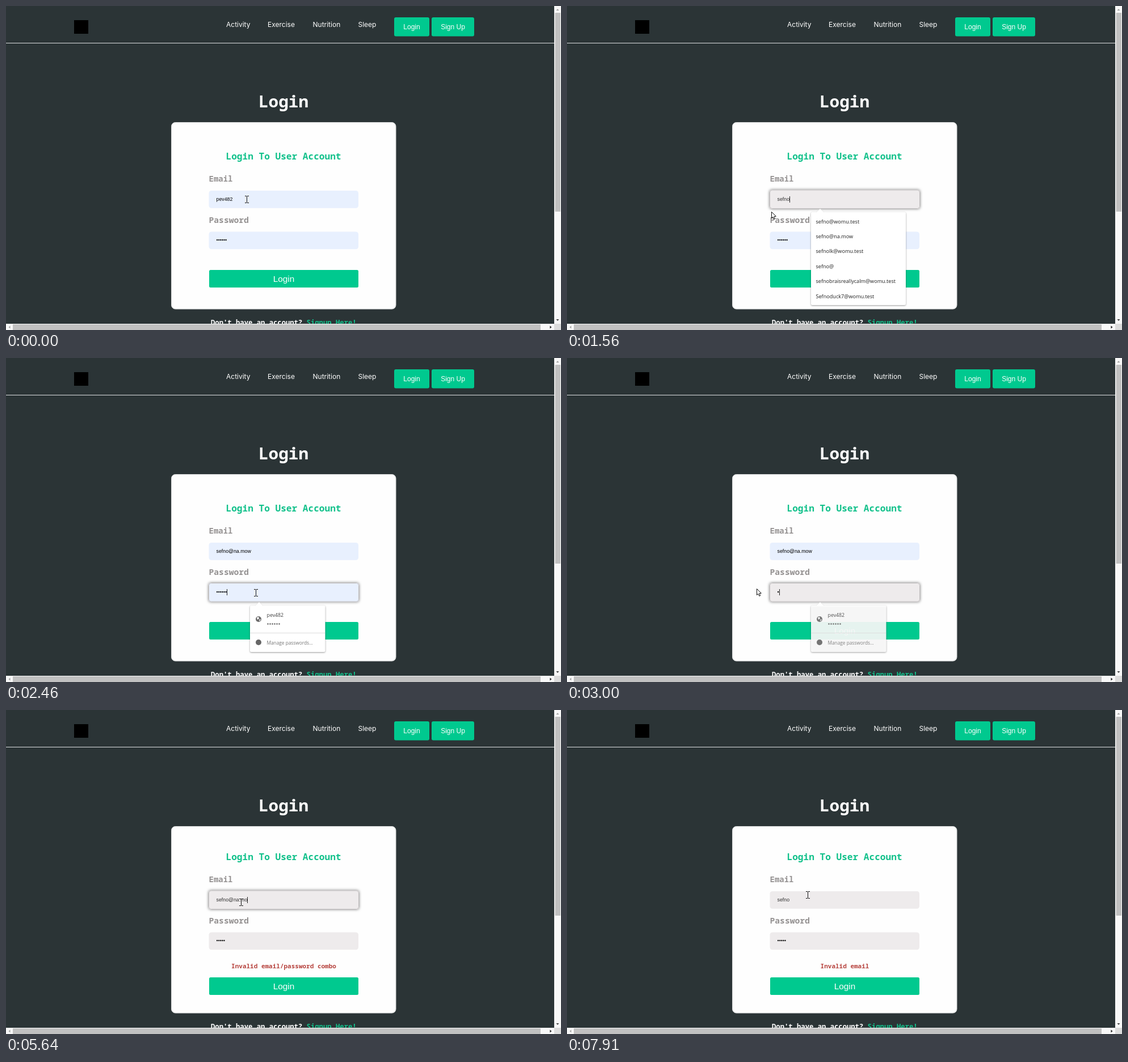
Animation, 978 px wide and 572 px high, one loop 8000 ms. Source, as an HTML page with a canvas:

```html
<!DOCTYPE html>
<html lang="en">
<head>
<meta charset="utf-8">
<title>Login form</title>
<style>
html, body { margin: 0; width: 100%; height: 100%; overflow: hidden; background: #2b3436; }
canvas { display: block; }
</style>
</head>
<body>
<canvas id="stage" width="978" height="572"></canvas>
<script>
const ctx = document.getElementById('stage').getContext('2d');
const LOOP = 8000, STEP = 90;
const GREEN = '#00c98f', FILLED = '#e8f0fe', TYPED = '#eeebec';
const MONO = '"Noto Sans Mono", "DejaVu Sans Mono", monospace';
const ARIAL = '"Liberation Sans", Arial, sans-serif';
const UI = '"Open Sans", "Noto Sans", sans-serif';
const NAV = 'Inter, sans-serif';

const OLD_USER = 'pev482', NAME = 'sefno', PICKED = 'sefno@na.mow';
const SHORT_LIST = ['sefno@womu.test', PICKED, 'sefnolk@womu.test', 'srulo@womu.test', 'sopune@sn', 'sn'];
const LONG_LIST = ['sefno@womu.test', PICKED, 'sefnolk@womu.test', 'sefno@',
  'sefnobraisreallycalm@womu.test', 'Sefnoduck7@womu.test'];

// Pointer moves: first step, last step, x, y
const MOVES = [
  [90, 180, 304, 343],
  [1560, 1920, 459, 399],
  [2010, 2010, 462, 403],
  [2280, 2280, 440, 414],
  [2550, 2820, 334, 407],
  [4290, 4560, 423, 476],
  [4740, 5010, 420, 447],
  [5100, 5280, 414, 339],
  [7100, 7280, 400, 482],
  [7550, 7820, 431, 384],
  [7910, 7910, 424, 326]
];

const during = (t, a, b) => t >= a && t < b;
const stepsSince = (t, start) => Math.floor((t - start) / STEP) + 1;

function pointerAt(t) {
  let x = 424, y = 341;
  for (const [from, to, tx, ty] of MOVES) {
    if (t < from) break;
    const p = Math.min(1, stepsSince(t, from) / ((to - from) / STEP + 1));
    const k = p * (2 - p);
    x += (tx - x) * k;
    y += (ty - y) * k;
  }
  return { x: Math.round(x), y: Math.round(y) };
}

function emailAt(t) {
  if (t < 640) return OLD_USER;
  if (t < 2190) return NAME.slice(0, stepsSince(t, 640));
  if (t < 5640) return PICKED;
  if (t < 6740) return PICKED.slice(0, Math.max(4, PICKED.length - stepsSince(t, 5640)));
  return NAME;
}

function dotsAt(t) {
  if (t < 3000) return 6;
  return 1 + [3180, 3360, 3540, 3820].filter(at => t >= at).length;
}

function sceneAt(t) {
  const s = { t, pointer: pointerAt(t), email: emailAt(t), dots: dotsAt(t), row: -1 };
  s.shift = t >= 4650 ? 6 : 0;
  s.emailY = 326 - s.shift;
  s.passY = 398.5 - s.shift;
  s.buttonY = 466 + s.shift;
  s.error = !s.shift ? '' : t < 7370 ? 'Invalid email/password combo' : 'Invalid email';
  s.focus = during(t, 90, 2370) || during(t, 5370, 7370) ? 'email' : during(t, 2370, 4560) ? 'pass' : '';
  s.emailFill = during(t, 640, 2190) || t >= 5640 ? TYPED : FILLED;
  s.passFill = t >= 3000 ? TYPED : FILLED;
  if (during(t, 640, 2190) || during(t, 6740, 7370)) {
    s.list = during(t, 640, 730) ? SHORT_LIST : LONG_LIST;
    s.listW = s.list === SHORT_LIST ? 114 : 167;
    const { x, y } = s.pointer, top = s.emailY + 41;
    if (x > 430 && x < 430 + s.listW && y > top) s.row = Math.floor((y - top) / 26.4);
  }
  if (s.row >= 0) {
    s.email = s.list[s.row];
    s.emailFill = FILLED;
  }
  s.saved = during(t, 90, 730) || during(t, 2370, 3090) || during(t, 5370, 5640);
  s.savedAlpha = during(t, 640, 730) || during(t, 3000, 3090) ? 0.9 : 1;
  return s;
}

function text(str, x, y, font, color, align = 'left') {
  ctx.font = font;
  ctx.fillStyle = color;
  ctx.textAlign = align;
  ctx.fillText(str, x, y);
}

function rect(x, y, w, h, color) {
  ctx.fillStyle = color;
  ctx.fillRect(x, y, w, h);
}

function box(x, y, w, h, r, color, stroke) {
  ctx.beginPath();
  ctx.roundRect(x, y, w, h, r);
  ctx.fillStyle = color;
  ctx.fill();
  if (stroke) {
    ctx.strokeStyle = stroke;
    ctx.lineWidth = 1;
    ctx.stroke();
  }
}

function circle(x, y, r, color) {
  ctx.beginPath();
  ctx.arc(x, y, r, 0, Math.PI * 2);
  ctx.fillStyle = color;
  ctx.fill();
}

function poly(points, fill, stroke) {
  ctx.beginPath();
  points.forEach(([x, y]) => ctx.lineTo(x, y));
  ctx.closePath();
  ctx.fillStyle = fill;
  ctx.fill();
  if (stroke) {
    ctx.strokeStyle = stroke;
    ctx.lineWidth = 1;
    ctx.stroke();
  }
}

function withShadow(color, blur, dy, draw) {
  ctx.save();
  ctx.shadowColor = color;
  ctx.shadowBlur = blur;
  ctx.shadowOffsetY = dy;
  draw();
  ctx.restore();
}

function drawHeader() {
  rect(0, 0, 978, 572, '#2b3436');
  rect(0, 65, 966, 1, '#dfe1e1');
  rect(120, 25, 25, 24, '#000');
  [['Activity', 388], ['Exercise', 461], ['Nutrition', 540.5], ['Sleep', 620.5]]
    .forEach(([label, x]) => text(label, x, 37, `12px ${NAV}`, '#fff'));
  [['Login', 684, 62], ['Sign Up', 750, 75]].forEach(([label, x, w]) => {
    box(x, 20, w, 33.5, 3, GREEN);
    text(label, x + w / 2, 40.5, `12px ${ARIAL}`, '#fff', 'center');
  });
  text('Login', 489, 179, `bold 29.33px ${MONO}`, '#fff', 'center');
}

function drawField(y, fill, focused) {
  if (focused) {
    withShadow('rgba(0,0,0,.55)', 5, 0, () => box(357, y - 1.5, 265, 33.5, 4, fill));
    box(357.5, y - 1, 264, 32.5, 4, fill, '#c3c0c1');
  } else {
    box(357.5, y, 263.5, 30.8, 4.5, fill);
  }
}

function drawCaret(x, y) {
  rect(Math.round(x), y - 5, 1, 11, '#222');
}

function drawEmail(s) {
  const mid = s.emailY + 15, focused = s.focus === 'email';
  const selected = during(s.t, 90, 640);
  const font = `8.8px ${ARIAL}`;
  drawField(s.emailY, s.emailFill, focused);
  ctx.font = font;
  const w = ctx.measureText(s.email).width;
  if (selected) rect(370.5, mid - 5, w, 11, '#3390ff');
  text(s.email, 370.5, mid + 3, font, selected ? '#fff' : s.emailFill === TYPED ? '#333' : '#000');
  if (focused && !selected && s.row < 0) drawCaret(370.5 + w, mid);
}

function drawPassword(s) {
  const mid = Math.round(s.passY + 14.5), focused = s.focus === 'pass';
  const selected = during(s.t, 2550, 3000);
  drawField(s.passY, s.passFill, focused);
  if (selected) rect(370.5, mid - 5, s.dots * 3.1, 11, '#3390ff');
  for (let i = 0; i < s.dots; i++) circle(372.1 + i * 3.1, mid, 1.2, selected ? '#fff' : '#111');
  if (focused && !selected) drawCaret(370.5 + s.dots * 3.1, mid);
}

function drawForm(s) {
  const up = s.shift;
  box(291.5, 205.5, 395.5, 329.5, 7, '#fefefe', '#d5d7d7');
  text('Login To User Account', 489, 271 - up, `bold 16.13px ${MONO}`, '#12c18b', 'center');
  text('Email', 357.5, 310 - up, `bold 14px ${MONO}`, '#959292');
  text('Password', 357.5, 382.5 - up, `bold 14.67px ${MONO}`, '#959292');
  drawEmail(s);
  drawPassword(s);
  text(s.error, 489.5, 456, `bold 11px ${MONO}`, '#b7443f', 'center');
  box(358, s.buttonY, 263, 31, 2.5, GREEN);
  text('Login', 489.5, s.buttonY + 21, `15.3px ${ARIAL}`, '#fff', 'center');
  text("Don't have an account?", 361, 563, `bold 12.22px ${MONO}`, '#fff');
  text('Signup Here!', 529.6, 563, `bold 12.22px ${MONO}`, '#12c18b');
}

function drawPopup(y, w, h) {
  withShadow('rgba(0,0,0,.4)', 3, 1, () => box(430, y, w, h, 2, '#fff'));
  poly([[439, y + 0.5], [446, y - 6], [453, y + 0.5]], '#fff');
  ctx.beginPath();
  ctx.moveTo(439, y);
  ctx.lineTo(446, y - 6);
  ctx.lineTo(453, y);
  ctx.strokeStyle = '#e2e2e2';
  ctx.lineWidth = 0.7;
  ctx.stroke();
}

function drawSaved(y) {
  drawPopup(y, 132.5, 82);
  circle(445, y + 24, 5, '#6c6c6c');
  poly([[442, y + 21], [445, y + 20], [446, y + 23], [443, y + 25]], '#fff');
  poly([[446, y + 25], [449, y + 24], [447, y + 28]], '#fff');
  text(OLD_USER, 459.5, y + 19.5, `8.8px ${UI}`, '#444');
  for (let i = 0; i < 6; i++) circle(461.5 + i * 4, y + 32.5, 1.3, '#666');
  rect(430.5, y + 48, 131.5, 1, '#dcdcdc');
  circle(445, y + 65, 5, '#666');
  text('Manage passwords...', 459.5, y + 69, `8.3px ${UI}`, '#777');
}

function drawList(s) {
  const y = s.emailY + 38;
  drawPopup(y, s.listW, 164);
  if (s.row >= 0) rect(430, y + 3 + s.row * 26.4, s.listW, 26.4, '#e8e8e8');
  s.list.forEach((item, i) => text(item, 438.5, y + 19.5 + i * 26.4, `9.1px ${UI}`, '#222'));
}

function drawScrollbars() {
  rect(966, 0, 12, 572, '#f8f8f8');
  rect(0, 561, 978, 11, '#f8f8f8');
  rect(967.5, 12, 9.5, 351, '#c1c1c1');
  rect(12, 562, 930, 10, '#c1c1c1');
  rect(966, 561, 12, 11, '#dcdcdc');
  poly([[969.5, 8], [972, 5], [974.5, 8]], '#a3a3a3');
  poly([[969.5, 553], [974.5, 553], [972, 556]], '#444');
  poly([[7.5, 564.5], [7.5, 569.5], [4.5, 567]], '#a3a3a3');
  poly([[958.5, 564.5], [958.5, 569.5], [961.5, 567]], '#222');
}

function pointerKind(s) {
  const { x, y } = s.pointer;
  const top = (s.focus === 'pass' ? s.passY : s.emailY) + 38;
  const width = s.list ? s.listW : s.saved ? 132 : 0;
  const height = s.list ? 164 : 82;
  if (x > 430 && x < 430 + width && y > top && y < top + height) return 'arrow';
  if (x < 358 || x > 621) return 'arrow';
  const inside = (a, h) => y >= a && y <= a + h;
  if (inside(s.emailY, 31) || inside(s.passY, 31)) return 'beam';
  return inside(s.buttonY, 31) ? 'hand' : 'arrow';
}

const POINTERS = {
  arrow() {
    poly([[0.5, 0.5], [0.5, 11.5], [3, 9.3], [4.8, 13.3], [6.7, 12.5], [5, 8.6], [8.3, 8.3]], '#fff', '#111');
  },
  beam() {
    rect(0, -5, 1, 11, '#111');
    rect(-3, -6, 3, 1, '#111');
    rect(1, -6, 3, 1, '#111');
    rect(-3, 6, 3, 1, '#111');
    rect(1, 6, 3, 1, '#111');
  },
  hand() {
    poly([[-1.2, 1], [0, 0.3], [1.2, 1], [1.2, 5.3], [3.2, 5.3], [5, 6], [6.6, 7], [6.8, 11],
      [5.3, 16], [-1, 16], [-4.3, 10.5], [-4.6, 8.8], [-3, 8.6], [-1.2, 10.4]], '#fff', '#111');
    [1.6, 3.4, 5.1].forEach((x, i) => rect(x, 6 + i * 0.4, 0.7, 3, '#333'));
  }
};

function draw(t) {
  const s = sceneAt(t);
  drawHeader();
  drawForm(s);
  if (s.saved) {
    ctx.globalAlpha = s.savedAlpha;
    drawSaved(Math.round((s.focus === 'pass' ? s.passY : s.emailY) + 38));
    ctx.globalAlpha = 1;
  }
  if (s.list) drawList(s);
  drawScrollbars();
  ctx.save();
  ctx.translate(s.pointer.x, s.pointer.y);
  POINTERS[pointerKind(s)]();
  ctx.restore();
}

const start = performance.now();
function tick() {
  draw((performance.now() - start) % LOOP);
  requestAnimationFrame(tick);
}
tick();
</script>
</body>
</html>
```
